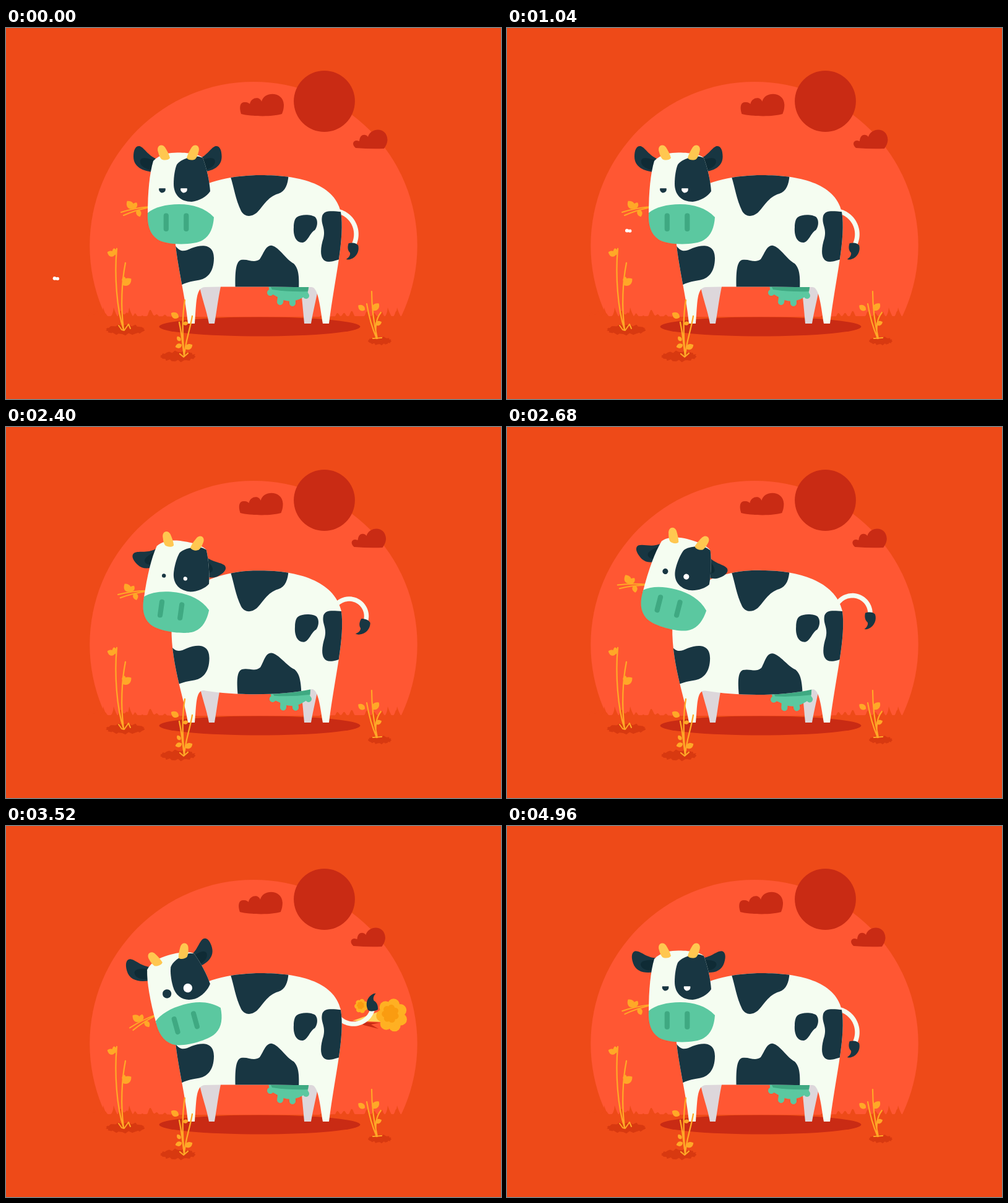
An HTML page with a canvas for the animation above (5000 ms loop, 800 by 600 pixels).

```html
<!DOCTYPE html>
<html lang="en">
<head>
<meta charset="utf-8">
<title>Cow at sunset</title>
<style>
html, body { margin: 0; width: 100%; height: 100%; overflow: hidden; background: #ee4a18; }
canvas { display: block; width: 800px; height: 600px; }
</style>
</head>
<body>
<canvas id="stage" width="800" height="600"></canvas>
<script>
const ctx = document.getElementById('stage').getContext('2d');
const LOOP = 5000;
const DEG = Math.PI / 180, TURN = Math.PI * 2;
const BG = '#ee4a18', GLOW = '#ff5733', RED = '#c92b14', DIRT = '#d83910';
const CREAM = '#f5fdf1', NAVY = '#183642', INNER_EAR = '#0f2b35', LILAC = '#ddd7db';
const GREEN = '#5bc8a0', DEEP_GREEN = '#3fa982', HORN = '#ffc750', STRAW = '#ffa827';

// Key poses: muzzle position and tilt, ears, eyes, belly, and the tail as an arc.
const REST = { x: 282, y: 318, tilt: 0, droop: 0, gaze: 0, eye: 5.4, open: .22, swell: 0, sag: 0, heading: 17, curl: 102, flick: 0 };
const LIFT = { ...REST, x: 273, y: 300.5, tilt: 8, droop: 55, gaze: 3.5, eye: 3.2, open: 1, swell: .82, heading: -50, curl: 160, flick: 22 };
const LEAN = { ...LIFT, x: 252.5, y: 282.5, tilt: 29.5, eye: 7.8, swell: 1, heading: -86, curl: 145, flick: 12 };
const RECOIL = { ...REST, x: 298, y: 320, tilt: -15.5, gaze: 6, eye: 7.2, open: 1, sag: 14, heading: 44, curl: -121 };
const SETTLE = { ...REST, x: 292, y: 320, tilt: -10, droop: 8, gaze: 5.2, eye: 6.9, open: .65, flick: 10 };
const DOZE = { ...REST, droop: 18, gaze: 3.6 };
const TIMELINE = [[0, REST], [1400, REST], [2300, LIFT], [2500, LIFT], [3000, LEAN], [3290, LEAN],
  [3460, RECOIL], [3600, RECOIL], [3950, SETTLE], [4050, SETTLE], [4600, DOZE], [LOOP, DOZE]];

function poseAt(t) {
  const i = TIMELINE.findIndex(([time]) => time > t);
  const [t0, from] = TIMELINE[i - 1], [t1, to] = TIMELINE[i];
  const u = (t - t0) / (t1 - t0), k = u * u * (3 - 2 * u);
  const pose = {};
  for (const key in from) pose[key] = from[key] + (to[key] - from[key]) * k;
  return pose;
}

function mixPath(a, b, k) {
  const to = b.match(/-?\d+(\.\d+)?/g);
  let i = 0;
  return new Path2D(a.replace(/-?\d+(\.\d+)?/g, v => +v + (to[i++] - v) * k));
}

function fill(path, color) {
  ctx.fillStyle = color;
  ctx.fill(typeof path === 'string' ? new Path2D(path) : path);
}

function line(path, color, width) {
  ctx.strokeStyle = color;
  ctx.lineWidth = width;
  ctx.stroke(typeof path === 'string' ? new Path2D(path) : path);
}

function oval(x, y, rx, ry, color, angle = 0) {
  ctx.fillStyle = color;
  ctx.beginPath();
  ctx.ellipse(x, y, rx, ry, angle * DEG, 0, TURN);
  ctx.fill();
}

function at(x, y, angle, draw) {
  ctx.save();
  ctx.translate(x, y);
  ctx.rotate(angle * DEG);
  draw();
  ctx.restore();
}

// Moves a drawing by (dx, dy) and turns it about (px, py).
function turned(px, py, angle, dx, dy, draw) {
  at(px + dx, py + dy, angle, () => {
    ctx.translate(-px, -py);
    draw();
  });
}

function mirrored(axis, draw) {
  draw();
  ctx.save();
  ctx.translate(axis * 2, 0);
  ctx.scale(-1, 1);
  draw();
  ctx.restore();
}

// Pointed leaf growing from (x, y).
function leaf(x, y, angle, size) {
  at(x, y, angle, () => {
    ctx.scale(size, size);
    fill('M0,0 C.2,-.5 .7,-.5 1,0 C.7,.45 .2,.4 0,0Z', STRAW);
  });
}

function drawGrass() {
  ctx.fillStyle = BG;
  ctx.fillRect(100, 467, 600, 160);
  ctx.beginPath();
  ctx.moveTo(130, 470);
  for (let x = 130; x <= 670; x += 1.5) {
    const side = Math.min(1, Math.max(0, (Math.abs(x - 390) - 110) / 40));
    const tuft = 4 * Math.sin(x * .52) + 3 * Math.sin(x * .27 + 1) + 3 * Math.sin(x * .14);
    ctx.lineTo(x, 467 - side * Math.max(1, 2 + tuft));
  }
  ctx.lineTo(670, 470);
  ctx.fill();
  for (const x of [157, 174, 199, 617, 632])
    fill(`M${x - 6},468 Q${x - 1},464 ${x},452 Q${x + 3},462 ${x + 7},468Z`, BG);
}

function drawSky(t) {
  ctx.fillStyle = BG;
  ctx.fillRect(0, 0, 800, 600);
  oval(400, 352, 264.7, 265, GLOW);
  drawGrass();
  oval(514.5, 118.5, 49.4, 49.4, RED);
  const u = t / LOOP;
  at(-3 * u, 0, 0, () => fill('M380,139 C376,126 379,119 387,120 C391,120 393,122 394,123 C396,112 410,110 413,119 C417,102 448,102 449,124 C449,132 447,136 446,139 C430,144 395,143 380,139Z', RED));
  at(-5 * u, 0, 0, () => fill('M565,194 C559,189 560,182 567,182 L571,183 C572,171 581,171 585,176 C590,160 616,160 616.5,181 C616,188 613,192 611,195 Q590,196 565,194Z', RED));
}

function drawDirt(x, y, w, h) {
  ctx.fillStyle = DIRT;
  ctx.beginPath();
  for (let i = 0; i < 36; i++) {
    const a = i / 36 * TURN, r = .85 + .22 * Math.sin(i * 2.4 + x);
    ctx.lineTo(x + Math.cos(a) * w * (.94 + .06 * Math.sin(i * 3)), y + Math.sin(a) * h * r);
  }
  ctx.fill();
}

function drawSidePlants() {
  drawDirt(193, 488, 33, 9);
  line('M179,357 C175,400 179,455 190,488 M193,380 C187,410 185,450 190,488', STRAW, 2.3);
  line('M182,481 L187,488 L191,489 L198,479 L201,486', STRAW, 2);
  leaf(176, 367, 200, 13);
  leaf(177, 367, 255, 11);
  leaf(189, 416, -38, 17);
  leaf(190, 411, -80, 9);
  drawDirt(604, 506, 20, 7);
  line('M591,426 C591,455 595,480 600,502 M583,446 C587,470 593,488 599,502 M606,460 C598,470 596,485 599,502', STRAW, 2.2);
  line('M593,502 L607,501', STRAW, 2.2);
  leaf(580, 456, 215, 13);
  leaf(593, 457, -50, 15);
  leaf(597, 480, -25, 11);
}

function drawFrontPlant() {
  drawDirt(278, 531, 30, 9);
  line('M289,440 C284,470 285,500 288,531 M301,466 C297,490 289,510 288,531 M280,476 C284,495 286,515 288,531', STRAW, 2.3);
  line('M281,527 L287,532 L294,526', STRAW, 2.2);
  leaf(279, 468, 210, 14);
  leaf(284, 512, 160, 11);
  leaf(282, 506, 235, 9);
  leaf(290, 519, -30, 13);
  leaf(286, 479, -15, 9);
}

// Swoops once at the left, then heads behind the muzzle.
function drawFly(t) {
  const u = t / 1040;
  if (u > 1.22) return;
  const turn = TURN * Math.min(u, 1);
  const x = 81 + 115 * u * u - 16 * Math.sin(turn / 2) - 10 * Math.sin(turn);
  const y = 405 - 77 * u + 42 * Math.sin(turn);
  const flap = t % 80 < 40 ? 10 : -25;
  oval(x - 2, y - .2, 3.3, 2.8, '#fff', flap);
  oval(x + 2.3, y + .3, 2.9, 2.6, '#fff', -flap);
}

function drawFlower(x, y, r, color) {
  for (let i = 0; i < 7; i++) {
    const a = i / 7 * TURN + .4;
    oval(x + Math.cos(a) * r * .64, y + Math.sin(a) * r * .7, r * .4, r * .4, color);
  }
  oval(x, y, r * .7, r * .7, color);
}

function drawPuff(x, y, r) {
  drawFlower(x, y, r, '#ffb022');
  drawFlower(x - r * .1, y - r * .1, r * .55, '#fa9c10');
}

function drawGas(t) {
  const u = (t - 3380) / 560;
  if (u <= 0 || u >= 1) return;
  const out = 1 - (1 - u) ** 2;
  const size = Math.min(1, u * 5) * Math.min(1, (1 - u) * 4 + .2);
  if (u < .45) {
    fill('M572,317 L604,318 L590,321 L602,328 L578,322Z', RED);
    fill('M560,315 L606,299 L610,317Z', '#ffd45c');
  }
  drawPuff(567 + 16 * out, 296 - 11 * out, 10.5 * size);
  drawPuff(592 + 72 * out, 306, 24.5 * size);
}

function drawTail({ swell, sag, heading, curl, flick }) {
  const steps = 30, step = (68 + 12 * swell) / steps;
  let x = 539 - 7 * swell, y = 297 - 11 * swell + sag;
  const path = new Path2D();
  path.moveTo(x, y);
  for (let i = 0; i < steps; i++) {
    const a = (heading + curl * (i + .5) / steps) * DEG;
    path.lineTo(x += Math.cos(a) * step, y += Math.sin(a) * step);
  }
  line(path, CREAM, 7.5);
  at(x, y, heading + curl - 113 + flick, () =>
    fill('M-8,-3 C-3,-5 5,-5 8,-1 C11,8 7,18 -2,22 Q-6,24 -9,23 C-4,19 -3,15 -4,12 C-9,8 -9,2 -8,-3Z', NAVY));
}

function drawUdder(swell) {
  at(457 + 3.5 * swell, 419 + 11.5 * swell, -6 * swell, () => {
    fill('M-33,-4 L33,-4 L30,12 Q4,32 -20,15 L-31,9Z', GREEN);
    for (const [x, y] of [[-30, 9], [-14, 24], [6, 26], [28, 14]])
      line(`M${x * .8},5 L${x},${y}`, GREEN, 10);
    fill('M-33,-8 L33,-8 L31,7 Q0,8 -27,4Z', DEEP_GREEN);
  });
}

const BODY = 'M290,270 C325,246 370,238 412,238 C470,238 530,250 541,297 C548,340 532,400 522,478 L512,478 C508,455 505,419 494,419 C440,419 370,418 322,419 C306,419 308,445 305,478 L294,478 C290,430 270,360 273,320Z';
const BODY_FULL = 'M290,270 C325,240 370,230 412,231 C470,231 530,248 542,297 C548,340 532,400 522,478 L512,478 C508,455 505,424 494,425 C440,439 370,437 322,428 C306,424 308,450 305,478 L294,478 C288,440 262,380 267,310Z';

function drawSpots(swell) {
  const spot = (path, dx, dy, angle = 0) =>
    turned(422, 395, angle * swell, dx * swell, dy * swell, () => fill(path, NAVY));
  spot('M358,225 L457,225 C457,246 455,263 440,268 C422,273 415,290 405,299 C396,306 386,306 380,296 C371,278 368,256 363,241Z', 0, -7);
  spot('M470,306 C478,300 496,302 500,306 C505,312 503,322 499,327 C491,331 488,346 479,347 C468,347 464,335 465,322 C465,314 467,308 470,306Z', 2.5, 1);
  spot('M550,298 C525,296 515,294 511,304 C508,318 517,322 513,340 C508,355 505,378 522,378 C530,378 537,374 550,372Z', 2.5, 1);
  spot('M268,344 C280,363 285,363 300,356 C318,349 336,350 336,372 C336,395 325,406 310,408 C298,410 290,412 283,416 L260,400Z', -9, 2);
  spot('M371,430 C370,400 370,378 380,375 C392,373 400,381 410,374 C416,366 420,350 430,352 C442,355 452,374 465,381 C474,390 474,405 473,430Z', 3, 17, -5);
}

function drawBody({ swell }) {
  fill('M312,414 L348,414 C343,435 341,455 337,478 L328,478 C324,455 317,440 312,414Z', LILAC);
  fill('M476,414 L506,414 C501,440 496,460 493,478 L482,478 C480,455 478,435 476,414Z', LILAC);
  drawUdder(swell);
  const body = mixPath(BODY, BODY_FULL, swell);
  fill(body, CREAM);
  ctx.save();
  ctx.clip(body);
  drawSpots(swell);
  ctx.restore();
}

function drawEye(x, r, open, color) {
  const a = open * Math.PI / 2;
  ctx.fillStyle = color;
  ctx.beginPath();
  ctx.arc(x, 261, r, -a, Math.PI + a);
  ctx.fill();
}

function drawStraw() {
  line('M232,289 Q208,291 186,298 M232,290 Q208,295 190,303', STRAW, 2);
  leaf(206, 292, 230, 16);
  leaf(206, 292, -62, 11);
  leaf(212, 294, 68, 12);
}

function drawEar() {
  fill('M248,233 C228,234 206,228 206,208 C206,196 210,190 216,191 C225,194 230,209 248,213Z', NAVY);
  fill('M217,214 C220,207 232,211 248,217 L246,230 C228,232 215,223 217,214Z', INNER_EAR);
}

function drawHead({ x, y, tilt, droop, gaze, eye, open }) {
  turned(282, 318, tilt, x - 282, y - 318, () => {
    turned(232, 290, -droop / 12, 0, 0, drawStraw);
    mirrored(277.3, () => turned(243, 226, -droop, droop * .08, droop * .06, drawEar));
    fill('M238,215 C248,204 265,201.5 277,201.5 C300,201.5 312,205 318,210 C324,225 329,248 330,264 L331,302 L229,302 C229,265 232,235 238,215Z', CREAM);
    fill('M276,221 C281,213 300,206 312,208 L318,210 C324,225 329,248 330,264 C325,272 312,280 300,281 C282,281 271,270 271,252 C271,240 273,228 276,221Z', NAVY);
    mirrored(278.5, () =>
      fill('M246,201 C242,190 252,186 257,193 C260,198 263,203 265,210 C263,214 255,214.5 251,212 C248,208 247,205 246,201Z', HORN));
    drawEye(252.5 + gaze, eye, open, NAVY);
    drawEye(287.5 + gaze, eye, open, '#fff');
    fill('M229,299 C240,290 258,285 280,285 C302,285 322,291 336,306 C335,322 330,336 318,343 C305,351.5 260,352 245,342 C232,333 228,318 229,299Z', GREEN);
    line('M258.8,303.5 V325 M291.3,303.5 V325', DEEP_GREEN, 8.2);
  });
}

function render(t) {
  const pose = poseAt(t);
  ctx.lineCap = 'round';
  ctx.lineJoin = 'round';
  drawSky(t);
  drawSidePlants();
  oval(410, 483, 162.5, 15.5, RED);
  drawFly(t);
  drawGas(t);
  drawTail(pose);
  drawBody(pose);
  drawHead(pose);
  drawFrontPlant();
}

const start = performance.now();
function tick() {
  render((performance.now() - start) % LOOP);
  requestAnimationFrame(tick);
}
tick();
</script>
</body>
</html>
```
